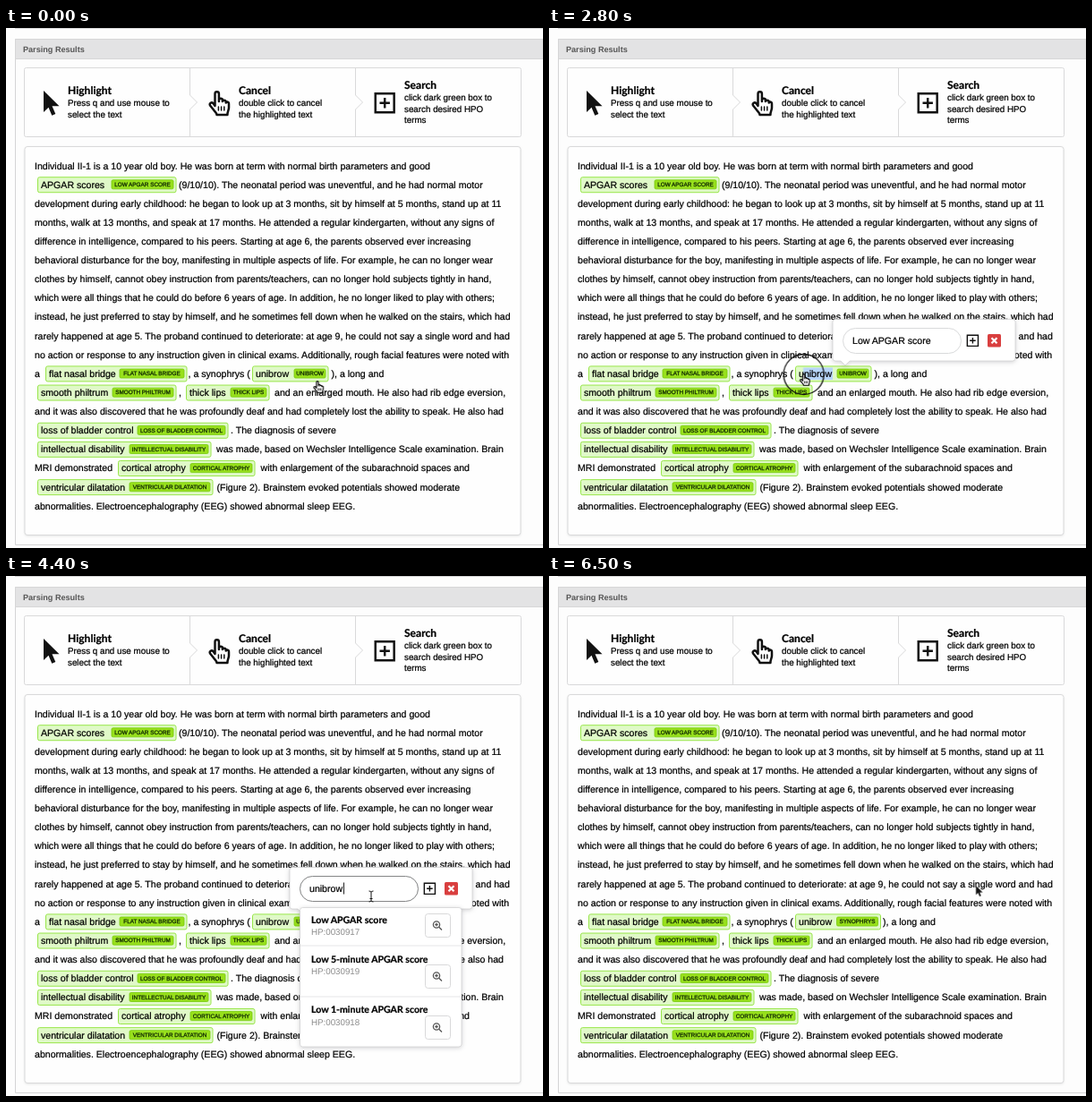
Animation of 600 by 581 pixels, one loop 6.7 s. Source, as an HTML page:

```html
<!DOCTYPE html>
<html lang="en">
<head>
<meta charset="utf-8">
<title>Parsing Results</title>
<style>
html, body { margin: 0; width: 100%; height: 100%; overflow: hidden; background: #fdfdfd; }
svg { display: block; width: 600px; height: 581px; font: 10.58px "Liberation Sans", Arial, sans-serif; text-rendering: geometricPrecision; }
text { fill: #000; stroke: #000; stroke-width: .22; white-space: pre; }
.head { font-size: 9.1px; font-weight: 700; fill: #555; stroke: none; }
.title { font: 700 12.06px Lato, sans-serif; }
.desc { font-size: 9.8px; }
.label { font-size: 6.36px; text-anchor: middle; fill: #0c2400; stroke: #0c2400; stroke-width: .25; }
.hit { font: 700 10.56px Lato, sans-serif; }
.code { font-size: 9.75px; fill: #8c8c8c; stroke: none; }
.line { fill: #fefefe; stroke: #d9d9da; }
.card { fill: #fff; stroke: #d4d4d5; stroke-width: .8; filter: drop-shadow(0 1.5px 2.5px rgba(34,36,38,.2)); }
.pill { fill: #e0f9c8; stroke: #98e64a; }
.tag { fill: #98e01c; stroke: #74c908; stroke-width: .8; }
.mark { fill: #b7d5f8; }

/* one loop is 6700 ms */
.a { animation: 6.7s linear infinite; }
.s { animation: 6.7s step-end infinite; opacity: 0; }

#cursor { animation-name: move; }
#hand { animation-name: hand; }
#beam { animation-name: beam; }
#arrow { animation-name: arrow; }
#ring { animation-name: press; }
#sel { animation-name: drag; transform-origin: 317px 0; }
#before { animation-name: before; }
#after { animation-name: after; }
#popup { animation-name: popup; }
#oldText { animation-name: oldText; }
#oldSel { animation-name: oldSel; }
#typed { animation-name: typed; }
#picked { animation-name: picked; }
#focus { animation-name: focus; }
#oldList { animation-name: oldList; }
#newList { animation-name: newList; transform-origin: 419px 392px; }

@keyframes move {
  0%, 1.4% { transform: translate(348px, 395px); animation-timing-function: ease-in-out; }
  8.9%, 22.3% { transform: translate(343px, 386px); animation-timing-function: ease-in-out; }
  29.8%, 32.8% { transform: translate(317px, 388px); }
  41.7% { transform: translate(285px, 387px); }
  43.2%, 47.7% { transform: translate(279px, 387px); animation-timing-function: ease-in-out; }
  53.6%, 58.2% { transform: translate(384px, 351px); animation-timing-function: ease-in-out; }
  62.6%, 67.1% { transform: translate(408px, 358px); animation-timing-function: ease-in-out; }
  70.1%, 80.5% { transform: translate(376px, 387px); animation-timing-function: ease-in-out; }
  89.5%, 100% { transform: translate(477px, 346px); }
}
@keyframes hand { 0% { opacity: 1; } 50.7% { opacity: 0; } 68.6% { opacity: 1; } 96.9%, 100% { opacity: 0; } }
@keyframes beam { 0% { opacity: 0; } 50.7% { opacity: 1; } 68.6%, 100% { opacity: 0; } }
@keyframes arrow { 0% { opacity: 0; } 96.9%, 100% { opacity: 1; } }
@keyframes press {
  0% { opacity: 0; } 11.9% { opacity: 1; } 13.4% { opacity: 0; }
  32.8% { opacity: 1; } 44.7% { opacity: 0; }
  55.2% { opacity: 1; } 58.2% { opacity: 0; }
  74.6% { opacity: 1; } 76.1% { opacity: 0; }
  91% { opacity: 1; } 92.5%, 100% { opacity: 0; }
}
@keyframes drag {
  0%, 32.8% { transform: scaleX(0); } 41.7% { transform: scaleX(.87); }
  43.2%, 55.2% { transform: scaleX(1); } 55.21%, 100% { transform: scaleX(0); }
}
@keyframes before { 0% { opacity: 1; } 94%, 100% { opacity: 0; } }
@keyframes after { 0% { opacity: 0; } 94%, 100% { opacity: 1; } }
@keyframes popup { 0%, 11.2% { opacity: 0; } 14.2%, 94.2% { opacity: 1; } 96.9%, 100% { opacity: 0; } }
@keyframes oldText { 0% { opacity: 1; } 62.6%, 100% { opacity: 0; } }
@keyframes oldSel { 0% { opacity: 0; } 58.2% { opacity: 1; } 62.6%, 100% { opacity: 0; } }
@keyframes typed { 0% { opacity: 0; } 62.6% { opacity: 1; } 76.1%, 100% { opacity: 0; } }
@keyframes picked { 0% { opacity: 0; } 76.1%, 100% { opacity: 1; } }
@keyframes focus { 0% { opacity: 0; } 55.2% { opacity: 1; } 76.1%, 100% { opacity: 0; } }
@keyframes oldList { 0%, 55.2% { opacity: 0; } 58.2%, 67.1% { opacity: 1; } 67.11%, 100% { opacity: 0; } }
@keyframes newList {
  0%, 67.1% { opacity: 0; transform: scale(1); } 67.11%, 76.1% { opacity: 1; transform: scale(1); }
  79.1%, 100% { opacity: 0; transform: scale(.91); }
}
</style>
</head>
<body>
<svg viewBox="0 0 600 581">
  <defs>
    <g id="handShape" stroke-linejoin="round" stroke-linecap="round">
      <path d="M7.5 17V3.5a2.2 2.2 0 0 1 4.4 0V12v-1.5a2 2 0 0 1 4 .5v1a2 2 0 0 1 3.8.5v1a1.8 1.8 0 0 1 3.3 1.2V19c0 3-1.6 4-1.6 8H9.5c0-2-2-3.5-3.5-5.5L2 16.5a2.1 2.1 0 0 1 3.4-2.4z"/>
      <path d="M11.4 18v4M14.6 18v4M17.8 18v4" stroke-width="1.5"/>
    </g>
    <path id="arrowShape" d="M0 0v24l5.5-5.3 3.8 9 4-1.7-3.8-8.8h8z"/>
    <path id="plus" d="M1 1h22v22H1zM12 6v12M6 12h12" fill="none" stroke="#111"/>
  </defs>

  <path d="M10 .5H600" stroke="#d8d8d9"/>
  <path d="M600 12.5H10.5V577.5H600" fill="none" stroke="#d4d4d5"/>
  <path d="M10.5 12.5H600V34.5H10.5z" fill="#e3e3e4" stroke="#d6d6d7"/>
  <text class="head" x="19" y="27">Parsing Results</text>

  <rect class="line" x="20.5" y="44.5" width="555" height="77" rx="2"/>
  <path class="line" d="M205.5 45V75l8 8-8 8v30M390.5 45V75l8 8-8 8v30"/>
  <use href="#arrowShape" x="42" y="70" fill="#111"/>
  <use href="#handShape" x="226" y="70" fill="none" stroke="#111" stroke-width="2.5"/>
  <use href="#plus" transform="translate(411.8 72.3) scale(.95)" stroke-width="2.6"/>
  <g id="steps"></g>

  <rect class="line" x="21" y="132.5" width="554" height="434" rx="3" style="filter:drop-shadow(0 1px 1px rgba(34,36,38,.1))"/>
  <g id="report"></g>
  <g id="before" class="s"></g>
  <g id="after" class="s"></g>

  <g id="popup" class="a">
    <path class="card" d="M320 325.5H518q3 0 3 3V369q0 3-3 3H336l-5 5-5-5h-6q-3 0-3-3V328.5q0-3 3-3z"/>
    <rect x="328.5" y="335.5" width="132" height="28" rx="14" fill="#fff" stroke="#d9dadb"/>
    <rect id="focus" class="s" x="328.5" y="335.5" width="132" height="28" rx="14" fill="#fff" stroke="#858687"/>
    <rect id="oldSel" class="s mark" x="339" y="342" width="88" height="14"/>
    <text id="oldText" class="s" x="339" y="352.6">Low APGAR score</text>
    <g id="typed" class="s">
      <text x="339" y="352.6">unibrow</text>
      <path d="M377.5 342.5v13" stroke="#222"/>
    </g>
    <text id="picked" class="s" x="339" y="352.6">Synophrys</text>
    <use href="#plus" transform="translate(466.8 342.7) scale(.55)" stroke-width="2.6"/>
    <rect x="490" y="342" width="15" height="14.5" rx="1.5" fill="#d93f3f"/>
    <path d="M494.5 346.3l6 6m0-6l-6 6" stroke="#fff" stroke-width="2.2"/>
  </g>
  <g id="oldList" class="a"></g>
  <g id="newList" class="a"></g>

  <g id="cursor" class="a">
    <circle id="ring" class="s" r="22.5" fill="none" stroke="#111" stroke-width="1.3"/>
    <g id="hand" class="s"><use href="#handShape" transform="translate(-4.8 -1) scale(.49)" fill="#fff" stroke="#000" stroke-width="2.3"/></g>
    <path id="beam" class="s" d="M-2.5-6Q0-6 0-4.5Q0-6 2.5-6M0-4.5V4.5M-2.5 6Q0 6 0 4.5Q0 6 2.5 6M-1.5 2.5h3" fill="none" stroke="#111"/>
    <g id="arrow" class="s"><use href="#arrowShape" transform="scale(.43)" fill="#111" stroke="#fff" stroke-width="1.5" paint-order="stroke"/></g>
  </g>
</svg>
<script>
const $ = id => document.getElementById(id);
const text = (x, y, s, cls = '') => `<text class="${cls}" x="${x}" y="${y}">${s}</text>`;
const rect = (x, y, w, h, cls, rx = 2) =>
  `<rect class="${cls}" x="${x}" y="${y}" width="${w}" height="${h}" rx="${rx}"/>`;
const mid = row => 154 + row * 21.12;
const say = (row, x, s) => text(x, mid(row) + 3.5, s);

function pill(row, x, word, tagX, tagW, tag, under = '') {
  const y = mid(row);
  return rect(x + .5, y - 8.4, tagX + tagW + 2.5 - x, 17, 'pill') + under + say(row, x + 4, word) +
    rect(tagX, y - 5.3, tagW, 10, 'tag', 1.5) + text(tagX + tagW / 2, y + 1.9, tag, 'label');
}

function step(x, y, title, lines) {
  return text(x, y, title, 'title') +
    lines.map((s, i) => text(x, y + 13.8 + i * 12.2, s, 'desc')).join('');
}

function list(bottom, hits) {
  return rect(328.5, 370.5, 180.5, bottom - 370.5, 'card', 3) + hits.map(([name, code, y, btn], i) =>
    (i ? `<path d="M329 ${btn - 34.5}H509" stroke="#e6e6e7"/>` : '') +
    text(341, y, name, 'hit') + text(341, y + 13.2, code, 'code') +
    rect(468.5, btn - 13, 28, 26, 'line', 3) +
    `<g fill="none" stroke="#555" stroke-width="1.3"><circle cx="481" cy="${btn - 1}" r="3.6"/>
     <path d="M483.7 ${btn + 1.7}l3.3 3.3M479.3 ${btn - 1}h3.4m-1.7-1.7v3.4"/></g>`
  ).join('');
}

const plain = {
  0: 'Individual II-1 is a 10 year old boy. He was born at term with normal birth parameters and good',
  2: 'development during early childhood: he began to look up at 3 months, sit by himself at 5 months, stand up at 11',
  3: 'months, walk at 13 months, and speak at 17 months. He attended a regular kindergarten, without any signs of',
  4: 'difference in intelligence, compared to his peers. Starting at age 6, the parents observed ever increasing',
  5: 'behavioral disturbance for the boy, manifesting in multiple aspects of life. For example, he can no longer wear',
  6: 'clothes by himself, cannot obey instruction from parents/teachers, can no longer hold subjects tightly in hand,',
  7: 'which were all things that he could do before 6 years of age. In addition, he no longer liked to play with others;',
  8: 'instead, he just preferred to stay by himself, and he sometimes fell down when he walked on the stairs, which had',
  9: 'rarely happened at age 5. The proband continued to deteriorate: at age 9, he could not say a single word and had',
  10: 'no action or response to any instruction given in clinical exams. Additionally, rough facial features were noted with',
  11: 'a',
  13: 'and it was also discovered that he was profoundly deaf and had completely lost the ability to speak. He also had',
  16: 'MRI demonstrated',
  18: 'abnormalities. Electroencephalography (EEG) showed abnormal sleep EEG.'
};

$('steps').innerHTML =
  step(69, 73.5, 'Highlight', ['Press q and use mouse to', 'select the text']) +
  step(260, 73.5, 'Cancel', ['double click to cancel', 'the highlighted text']) +
  step(445, 67.5, 'Search', ['click dark green box to', 'search desired HPO', 'terms']);

$('report').innerHTML = Object.entries(plain).map(([row, s]) => say(+row, 32, s)).join('') +
  pill(1, 35, 'APGAR scores', 118, 69, 'LOW APGAR SCORE') +
  say(1, 193, '(9/10/10). The neonatal period was uneventful, and he had normal motor') +
  pill(11, 44, 'flat nasal bridge', 127, 72, 'FLAT NASAL BRIDGE') +
  say(11, 203.5, ', a synophrys (') +
  pill(12, 35, 'smooth philtrum', 119, 68, 'SMOOTH PHILTRUM') + say(12, 193, ',') +
  pill(12, 201, 'thick lips', 251, 40, 'THICK LIPS') +
  say(12, 300, 'and an enlarged mouth. He also had rib edge eversion,') +
  pill(14, 35, 'loss of bladder control', 147, 98, 'LOSS OF BLADDER CONTROL') +
  say(14, 251, '. The diagnosis of severe') +
  pill(15, 35, 'intellectual disability', 138, 88, 'INTELLECTUAL DISABILITY') +
  say(15, 235, 'was made, based on Wechsler Intelligence Scale examination. Brain') +
  pill(16, 125, 'cortical atrophy', 206, 69, 'CORTICAL ATROPHY') +
  say(16, 284.5, 'with enlargement of the subarachnoid spaces and') +
  pill(17, 35, 'ventricular dilatation', 138, 90, 'VENTRICULAR DILATATION') +
  say(17, 235.5, '(Figure 2). Brainstem evoked potentials showed moderate');

const mark = '<rect id="sel" class="a mark" x="279.5" y="379.5" width="37.5" height="13.5"/>';
$('before').innerHTML = pill(11, 275, 'unibrow', 322, 35, 'UNIBROW', mark) + say(11, 363.5, '), a long and');
$('after').innerHTML = pill(11, 275, 'unibrow', 321.5, 46, 'SYNOPHRYS') + say(11, 373, '), a long and');

$('oldList').innerHTML = list(526, [
  ['Low APGAR score', 'HP:0030917', 387.8, 390.5],
  ['Low 5-minute APGAR score', 'HP:0030919', 431.5, 447.5],
  ['Low 1-minute APGAR score', 'HP:0030918', 488.3, 504.5]
]);
$('newList').innerHTML = list(413, [['Synophrys', 'HP:0000664', 387.8, 390.5]]);
</script>
</body>
</html>
```
